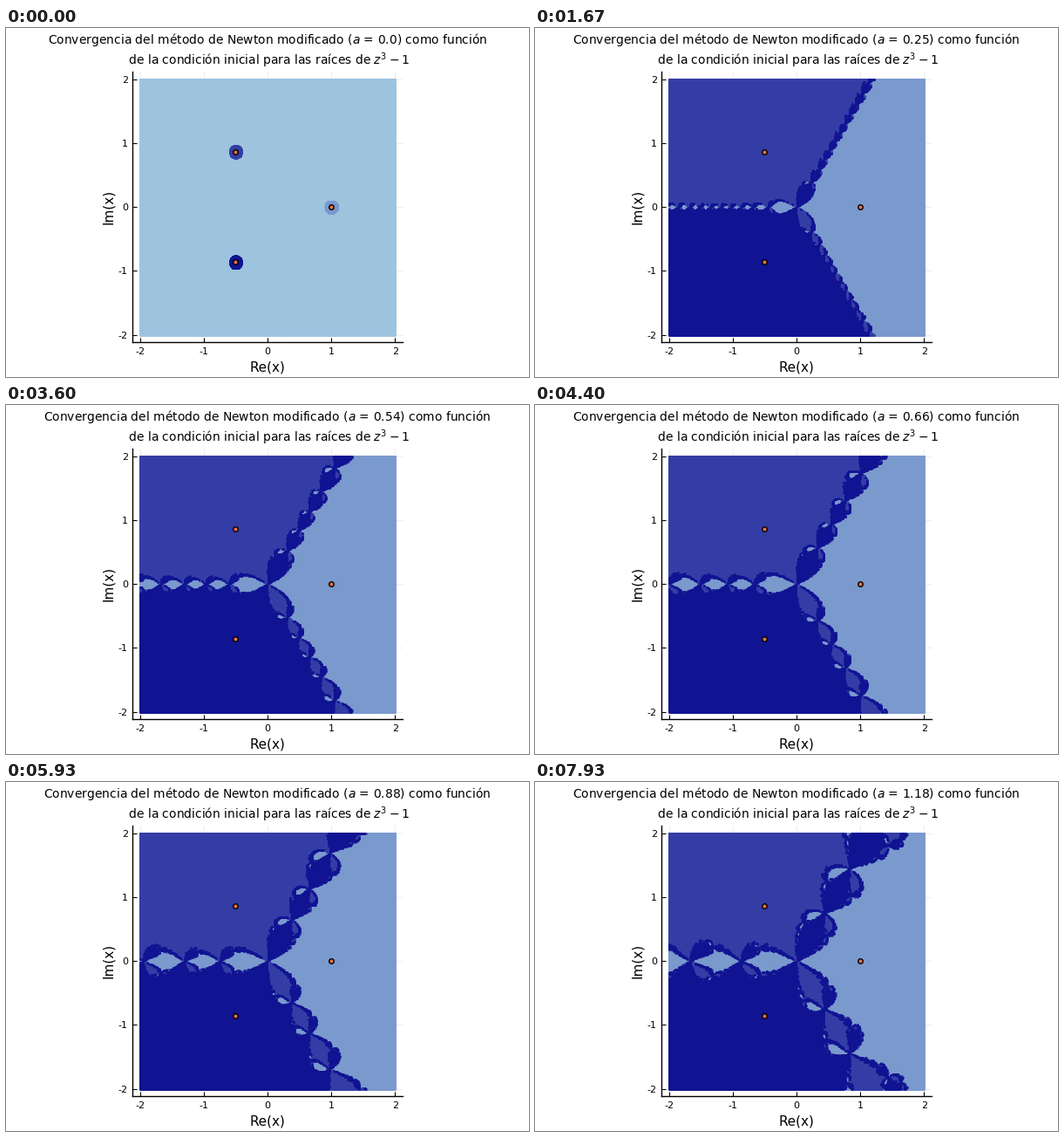
A matplotlib script for the animation above (8 s loop, 600 px wide and 400 px high).

```python
import numpy as np
import matplotlib.pyplot as plt
from matplotlib.animation import FuncAnimation

W, H, DPI = 600, 400, 100
FRAMES, LOOP_MS = 120, 8000
LIMIT = 2.12           # half width of the axes in data units
STEP = 0.01            # spacing of the initial conditions
MAX_ITER, CHECK_EVERY = 100, 4
TOL = 0.1
LEFT, TOP, SIDE = 144.8, 49.9, 310.4

ROOTS = np.exp(2j * np.pi * np.arange(3) / 3)
COLORS = ["#9dc3df", "#7a99cd", "#343da5", "#101392"]
MIRROR = np.array([0, 1, 3, 2])    # labels after complex conjugation

plt.rcParams["font.family"] = "DejaVu Sans"
plt.rcParams["mathtext.fontset"] = "dejavusans"
plt.rcParams["text.kerning_factor"] = 6

N = round(2 / STEP)
axis = np.arange(-N, N + 1) * STEP
X, Y = np.meshgrid(axis, axis)
START = (X + 1j * Y)[N:].ravel()   # upper half plane


def basins(a):
    """Number of the root reached from each start, 0 where none is reached."""
    label = np.zeros(START.size, dtype=int)
    active = np.arange(START.size)
    z = START.copy()
    with np.errstate(all="ignore"):
        for i in range(MAX_ITER + 1):
            if i % CHECK_EVERY == 0:
                for k, root in enumerate(ROOTS, 1):
                    label[active[np.abs(z - root) < TOL]] = k
                keep = (label[active] == 0) & np.isfinite(z)
                active, z = active[keep], z[keep]
                if a == 0 or active.size == 0:
                    break
            z = z - a / 3 * (z - 1 / (z * z))
    upper = label.reshape(N + 1, 2 * N + 1)
    return np.vstack([MIRROR[upper[:0:-1]], upper])


def title(a):
    return (f"Convergencia del método de Newton modificado ($a$ = {a}) como función\n"
            " de la condición inicial para las raíces de $z^3 - 1$")


fig = plt.figure(figsize=(W / DPI, H / DPI), dpi=DPI, facecolor="white")
ax = fig.add_axes([LEFT / W, 1 - (TOP + SIDE) / H, SIDE / W, SIDE / H])
ax.set_axisbelow(True)

# One layer of dots per basin; later layers overlap the earlier ones.
layers = [ax.plot([], [], "o", ms=2, mew=0, color=c, zorder=2 + k / 10)[0]
          for k, c in enumerate(COLORS)]
ax.plot(ROOTS.real, ROOTS.imag, "o", ms=4, mfc="#e36f47", mec="black",
        mew=1, zorder=3)

ax.set_xlim(-LIMIT, LIMIT)
ax.set_ylim(-LIMIT, LIMIT)
ticks = range(-2, 3)
ax.set_xticks(ticks, [str(t) for t in ticks])
ax.set_yticks(ticks, [str(t) for t in ticks])
ax.tick_params(direction="in", length=3.5, width=0.8, labelsize=8, pad=3.5)
ax.tick_params(axis="x", pad=4.4)
ax.grid(color="black", alpha=0.1, linewidth=0.5)
for side in ("top", "right"):
    ax.spines[side].set_visible(False)
for side in ("left", "bottom"):
    ax.spines[side].set_linewidth(1)

fig.text(300 / W, 1 - 389 / H, "Re(x)", size=11, ha="center", va="center")
fig.text(117 / W, 1 - 205.1 / H, "Im(x)", size=11, ha="center", va="center",
         rotation=90)
heading = ax.set_title(title(0.0), size=10, pad=6)


def update(i):
    a = round(i / 100, 2)
    label = basins(a)
    for k, layer in enumerate(layers):
        hit = label == k
        layer.set_data(X[hit], Y[hit])
    heading.set_text(title(a))
    return [*layers, heading]


anim = FuncAnimation(fig, update, frames=FRAMES, interval=LOOP_MS / FRAMES,
                     init_func=lambda: layers, repeat=True, repeat_delay=0,
                     blit=False)
plt.show()
```
